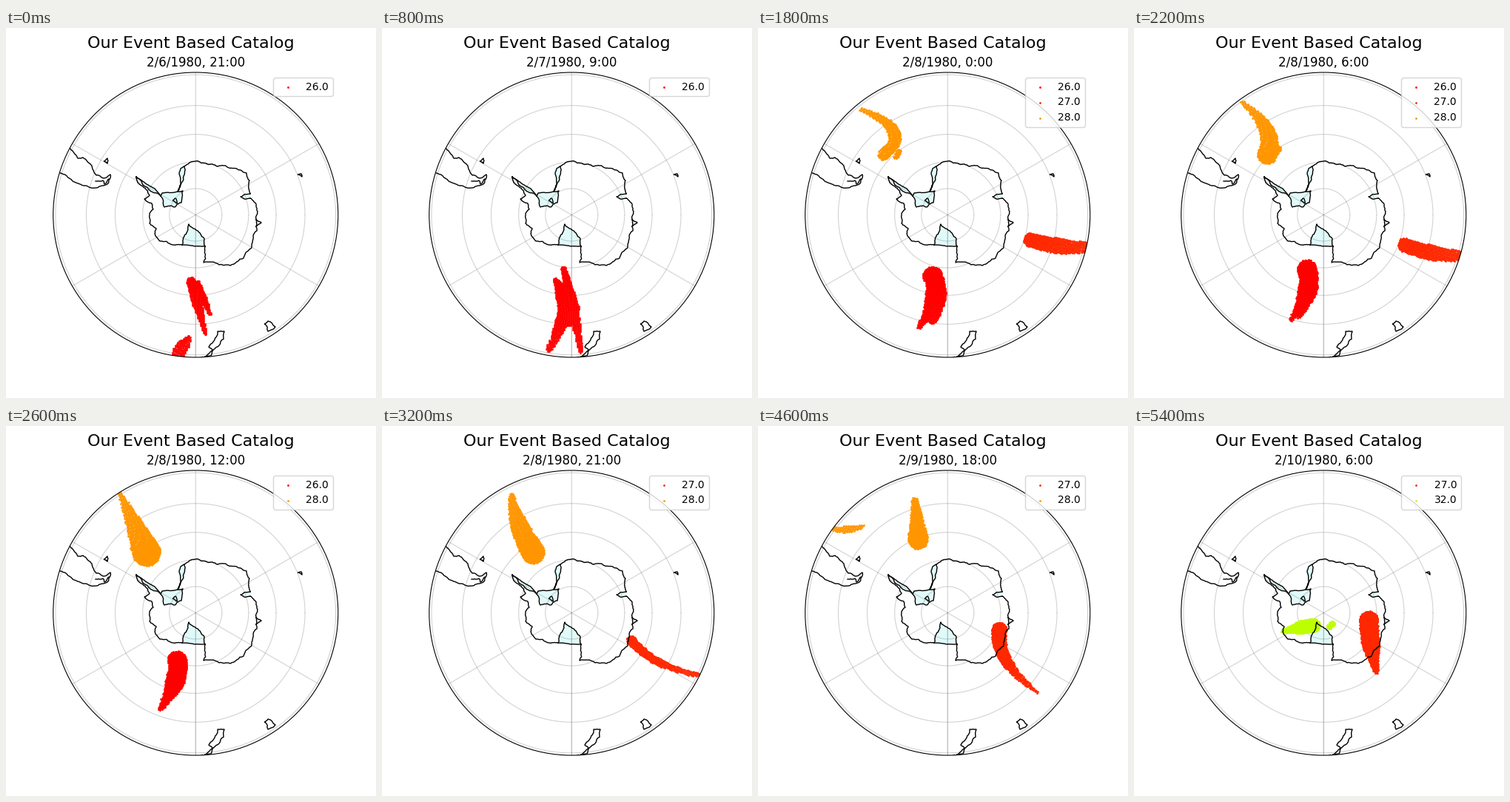
Recreate the animation shown at these times as a matplotlib script. Size 500 by 500 pixels, loop 5.6 s.

```python
import numpy as np
import matplotlib.pyplot as plt
from matplotlib.animation import FuncAnimation
from matplotlib.patches import Circle, Polygon

FRAMES, STEP_MS = 28, 200
CX, CY, R = 256.25, 252.5, 192.5
POLE = CX + 1j * CY
DRIFT = np.radians(1.8)  # storms turn around the pole, per frame
COLORS = {26: "#ff0000", 27: "#ff2800", 28: "#ff9600", 32: "#beff00"}
rng = np.random.default_rng(7)


def radius(colat):
    """Polar stereographic distance from the pole."""
    return 406 * np.tan(np.radians(colat) / 2)


# ---- map --------------------------------------------------------------------
fig = plt.figure(figsize=(5, 5), dpi=100)
ax = fig.add_axes([(CX - R) / 500, 1 - (CY + R) / 500, R / 250, R / 250])
ax.set(xlim=(CX - R, CX + R), ylim=(CY + R, CY - R))
ax.axis("off")
fig.suptitle("Our Event Based Catalog", fontsize=16, y=0.978)
title = ax.set_title("", fontsize=12)
disc = Circle((CX, CY), R, fc="none", ec="k", lw=0.8, zorder=2.5, clip_on=False)
ax.add_patch(disc)

GRID = dict(color="gray", alpha=0.35, lw=0.8, zorder=0.8, snap=False)
turn = np.linspace(0, 2 * np.pi, 200)
for colat in range(10, 51, 10):
    z = POLE + radius(colat) * np.exp(1j * turn)
    ax.plot(z.real, z.imag, **GRID)
for deg in (30, 90, 90, 150, 210, 270, 330):  # the date line is drawn twice
    z = POLE + R * np.exp(1j * np.radians(deg)) * np.array([0, 1])
    ax.plot(z.real, z.imag, **GRID)


def coast(*points, levels=3, amount=0.14):
    """Ragged shoreline through key points by midpoint displacement."""
    z = np.array([x + 1j * y for x, y in points])
    for _ in range(levels):
        d = np.diff(z)
        mid = z[:-1] + d * (0.5 + 1j * rng.uniform(-amount, amount, len(d)))
        z = np.append(np.column_stack([z[:-1], mid]).ravel(), z[-1])
    line, = ax.plot(z.real, z.imag, color="k", lw=1, zorder=2)
    line.set_clip_path(disc)
    return z


def ice(inland, front):
    z = np.append(inland, front[::-1])
    ax.add_patch(Polygon(np.column_stack([z.real, z.imag]), fc="#e0fafa",
                         ec="none", zorder=0.5))


maud = coast((232, 221), (238, 208), (240, 200), (241, 187))
coast((241, 187), (256, 180), (272, 184), (285, 187), (299, 188), (313, 191),
      (325, 196), (329, 206), (328, 218), (330, 224))
amery = coast((330, 224), (317, 228), (322, 231), (330, 230))
coast((330, 230), (338, 238), (340, 248), (338, 259))
bay = coast((338, 259), (338, 268))
coast((338, 268), (339, 274), (333, 290), (331, 298), (321, 311), (303, 321),
      (288, 320), (267, 317), (269, 295))
ross = coast((269, 295), (268, 285), (262, 277), (252, 270), (247, 265),
             (245, 275), (241, 281), (238, 293))
coast((238, 293), (225, 293), (208, 288), (201, 278), (203, 271), (194, 264),
      (194, 252), (199, 245), (197, 237), (187, 231), (194, 226), (187, 216),
      (178, 209), (176, 201))
peninsula = coast((176, 201), (184, 210), (194, 219), (209, 227))
ronne = coast((209, 227), (214, 242), (228, 242), (237, 236), (239, 220), (232, 221))
coast((226, 233), (231, 237), (229, 230), (226, 233))

ice(ross, coast((269, 295), (255, 295), (238, 293), amount=0.05))
ice(ronne, coast((209, 227), (211, 223), (232, 221), amount=0.05))
ice(maud, coast((232, 221), (235, 200), (236, 190), (241, 187)))
ice(peninsula, coast((176, 201), (190, 211), (201, 217), (209, 227), amount=0.08))
ice(bay, coast((338, 259), (345, 263), (338, 268)))
ice(amery, amery[:1])

coast((86, 162), (92, 169), (97, 176), (104, 175), (116, 186), (122, 199),
      (131, 203), (141, 198), (138, 210), (122, 216), (107, 213), (90, 207),
      (72, 196))
coast((121, 207), (131, 206), (133, 211), (139, 204))
coast((133, 180), (137, 176), (137, 183), (133, 180))
coast((395, 198), (399, 197), (400, 201), (395, 198), levels=1)
coast((350, 400), (354, 396), (364, 404), (354, 410), (350, 400))
coast((264, 445), (277, 443), (288, 429), (295, 410), (286, 410), (280, 424),
      (274, 431), (279, 435), (270, 444))


# ---- storms -----------------------------------------------------------------
# Each pose is a curved band: head, middle and tail points, then half-widths.
def pose(head, middle, tail, *widths):
    return np.array([complex(*p) for p in (head, middle, tail)] + list(widths))


# label, first frame, last frame, poses by frame
STORMS = [
    (26, 0, 15, {0: pose((250, 343), (258, 370), (269, 414), 7, 8, 3),
                 4: pose((245, 325), (257, 375), (268, 437), 4, 9, 4),
                 9: pose((236, 335), (241, 362), (235, 393), 13, 13, 8),
                 13: pose((231, 317), (228, 345), (208, 382), 13, 13, 4)}),
    (26, 0, 8, {0: pose((258, 345), (268, 368), (275, 387), 5, 5, 3),
                4: pose((234, 341), (244, 362), (250, 396), 4, 10, 10),
                9: pose((240, 340), (240, 360), (236, 390), 8, 10, 6)}),
    (26, 0, 12, {0: pose((246, 420), (238, 430), (232, 440), 5, 9, 9),
                 4: pose((246, 375), (241, 400), (225, 435), 9, 9, 5),
                 9: pose((232, 335), (237, 365), (217, 404), 10, 12, 4),
                 13: pose((230, 317), (226, 345), (207, 384), 10, 10, 3)}),
    (27, 7, 11, {9: pose((368, 286), (405, 294), (445, 296), 10, 11, 8)}),
    (27, 16, 27, {19: pose((333, 297), (368, 330), (420, 352), 7, 6, 4),
                  23: pose((326, 276), (336, 318), (378, 360), 11, 8, 3),
                  27: pose((317, 263), (320, 295), (327, 332), 13, 12, 4)}),
    (28, 8, 25, {9: pose((140, 110), (183, 140), (168, 172), 4, 9, 8),
                 13: pose((154, 92), (174, 135), (190, 172), 4, 12, 19),
                 19: pose((196, 98), (195, 130), (220, 172), 6, 12, 13),
                 23: pose((212, 102), (214, 128), (216, 154), 6, 9, 14)}),
    (28, 8, 11, {9: pose((190, 167), (188, 171), (185, 175), 4, 4, 3)}),
    (28, 22, 24, {23: pose((102, 139), (122, 139), (142, 135), 4, 6, 3)}),
    (32, 25, 27, {27: pose((201, 277), (225, 272), (243, 269), 3, 9, 9)}),
    (32, 25, 27, {27: pose((264, 271), (266, 269), (268, 267), 4, 4, 4)}),
]

# map cells of 0.5 by 0.625 degrees
CELLS = (POLE + radius(np.arange(0.5, 51, 0.5))[:, None]
         * np.exp(1j * np.radians(np.arange(0, 360, 0.625)))).ravel()
T = np.linspace(0, 1, 45)
BLEND = np.array([(1 - T) * (1 - 2 * T), 4 * T * (1 - T), T * (2 * T - 1)])
LUMPS = 1 + 0.1 * rng.uniform(-1, 1, len(T))


def pose_at(keys, n):
    """Blend between poses; outside their span drift around the pole."""
    times = sorted(keys)
    t = np.clip(n, times[0], times[-1])
    a = max(k for k in times if k <= t)
    b = min(k for k in times if k >= t)
    p = keys[a] + (keys[b] - keys[a]) * (t - a) / max(b - a, 1)
    p[:3] = POLE + (p[:3] - POLE) * np.exp(1j * DRIFT * (n - t))
    return p


def covered(p):
    spine = p[:3] @ BLEND
    half = np.interp(T, [0, 0.5, 1], p[3:].real) * LUMPS - 1
    near = np.flatnonzero(np.abs(CELLS - p[1]) < 110)
    hit = np.abs(CELLS[near, None] - spine) < half
    return near[hit.any(axis=1)]


dots = {}
for label, color in COLORS.items():
    dots[label] = ax.scatter([], [], s=1, c=color, label=f"{label:.1f}", zorder=1)
    dots[label].set_clip_path(disc)


def update(n):
    hours = 21 + 3 * n
    title.set_text(f"2/{6 + hours // 24}/1980, {hours % 24}:00")
    found = {label: [] for label in COLORS}
    for label, first, last, keys in STORMS:
        if first <= n <= last:
            found[label].extend(covered(pose_at(keys, n)))
    for label, idx in found.items():
        z = CELLS[np.unique(np.array(idx, int))]
        dots[label].set_offsets(np.column_stack([z.real, z.imag]))
    ax.legend(handles=[dots[k] for k in COLORS if found[k]], loc="upper right")
    return list(dots.values())


anim = FuncAnimation(fig, update, frames=FRAMES, interval=STEP_MS,
                     repeat=True, repeat_delay=0, blit=False)
plt.show()
```
